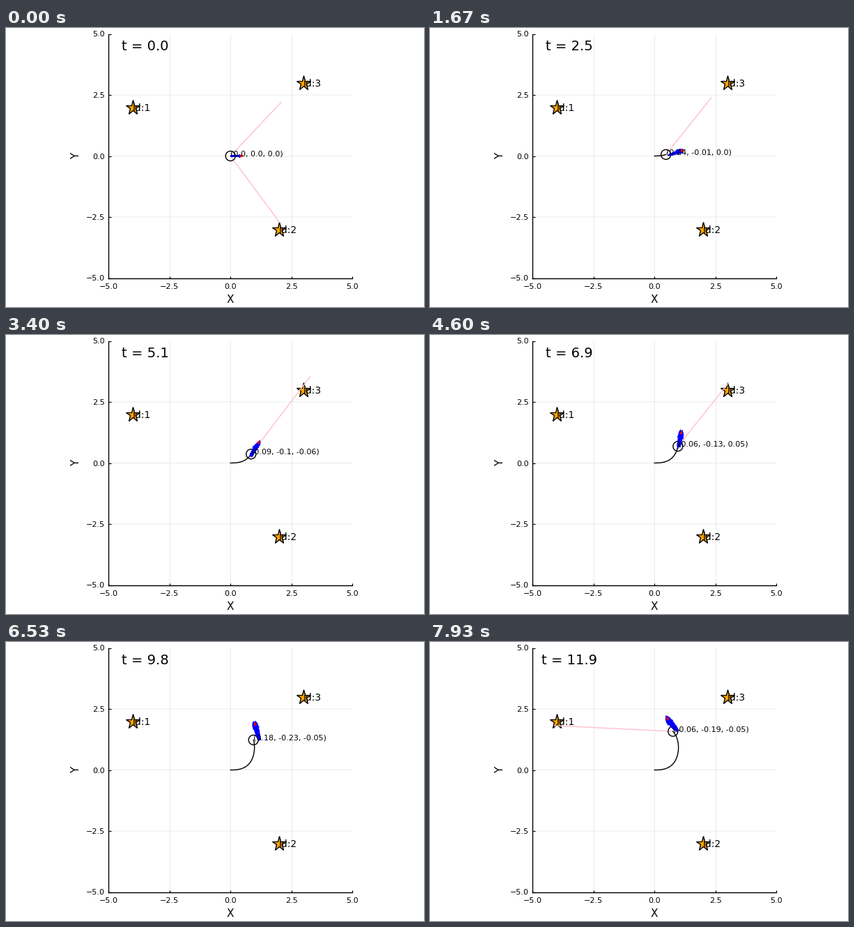
Write a matplotlib script that moves like this. It is 600 px wide and 400 px high and loops after 8 s.

```python
import numpy as np
import matplotlib.pyplot as plt
from matplotlib.animation import FuncAnimation

W, H, DPI = 600, 400, 100
STEPS, LOOP = 120, 8000
TICKS = 2 * STEPS             # two ticks per step, each step begins half a step early
PX = 72 / DPI                 # points per pixel
UNIT = 35.0                   # pixels per metre
LEFT, RIGHT, TOP, BOTTOM = 147.2, 497.2, 8.5, 358.5
N = 45                        # particles
FOV = np.radians(60)
SPEED, ARROW = 0.19, 19 / UNIT
MARKS = np.array([(-4, 2), (2, -3), (3, 3)])

plt.rcParams["font.family"] = "DejaVu Sans"
rng = np.random.default_rng(7)
time = np.arange(STEPS) / 10


def unit(angle):
    return np.stack([np.cos(angle), np.sin(angle)], axis=-1)


# Robot: steady speed on a circle, with a wobble that dies away
heading = np.radians(11 * time - 10 * (1 - time / 12) * np.sin(0.75 * time))
robot = np.vstack([(0, 0), np.cumsum(SPEED * 0.1 * unit(heading), axis=0)[:-1]])

# Printed error drifts between key points; the estimate sits that far off
KEYS = [0, 2.5, 5.1, 6.9, 8.6, 9.8, 11.9]
error = np.stack([np.interp(time, KEYS, v) for v in (
    [0, .24, .09, .06, .15, .18, -.06],
    [0, -.01, -.1, -.13, -.19, -.23, -.19],
    [0, 0, -.06, .05, -.04, -.05, -.05])], axis=1)
guess = robot + np.abs(error[:, :2])
ahead, aside = unit(heading), unit(heading + np.pi / 2)

# Particle cloud widens with time and lags a little behind the estimate
lag = -3 / UNIT * (1 - np.exp(-time))
stretch = 4 / UNIT * (1 - np.exp(-time / 3))
spread = (0.6 + 0.12 * time) / UNIT * np.minimum(1, time)
dice = np.clip(rng.normal(0, 1, (2, 3, N)), -1.6, 1.6)
rate = rng.uniform(0.6, 1.6, N)

# Range readings
gain = rng.normal(1, 0.04, (STEPS, 3))
gain[:, 2] *= np.interp(time, [0, 2.5, 5.1, 8.6], [0.72, 0.81, 1.21, 0.9])
skew = rng.normal(0.04, 0.015, (STEPS, 3))


def particles(k):
    along, across, turn = dice[0] * np.cos(rate * time[k]) + dice[1] * np.sin(rate * time[k])
    pos = (guess[k] + np.outer(lag[k] + along * stretch[k], ahead[k])
           + np.outer(across * spread[k], aside[k]))
    return pos, 0.5 * unit(heading[k] + 0.05 * turn * min(1, time[k]))


def ray(k, j):
    d = MARKS[j] - robot[k]
    bearing = np.arctan2(d[1], d[0])
    if abs(bearing - heading[k]) > FOV:
        return [], []
    end = robot[k] + np.hypot(*d) * gain[k, j] * unit(bearing + skew[k, j])
    return np.transpose([robot[k], end])


# Stage
fig = plt.figure(figsize=(W / DPI, H / DPI), dpi=DPI, facecolor="white")
ax = fig.add_axes([LEFT / W, 1 - BOTTOM / H, (RIGHT - LEFT) / W, (BOTTOM - TOP) / H])
ax.set(xlim=(-5, 5), ylim=(-5, 5))
marks = np.arange(-5, 5.1, 2.5)
names = [f"{v:.1f}".replace("-", "\u2212") for v in marks]
ax.set_xticks(marks, names)
ax.set_yticks(marks, names)
ax.tick_params(direction="in", length=3.5 * PX, width=1.2 * PX, labelsize=8)
ax.tick_params(axis="x", pad=8 * PX)
ax.tick_params(axis="y", pad=5.5 * PX)
ax.grid(color="black", alpha=0.1, lw=0.8 * PX)
for line in ax.get_ygridlines():
    line.set_snap(False)
ax.set_axisbelow(True)
for side in ("top", "right"):
    ax.spines[side].set_visible(False)
for side in ("left", "bottom"):
    ax.spines[side].set_linewidth(1.4 * PX)
fig.text(322 / W, 1 - 389 / H, "X", size=11, ha="center", va="center")
fig.text(100.8 / W, 1 - 183.5 / H, "Y", size=11, ha="center", va="center", rotation=90)

ax.plot(*MARKS.T, "*", ms=21.5 * PX, mfc="orange", mec="black", mew=1.4 * PX, zorder=3)
for j, (x, y) in enumerate(MARKS, 1):
    ax.text(x, y, f"id:{j}", size=10, ha="left", va="center_baseline", zorder=8)

rays = [ax.plot([], [], color="pink", lw=1.4 * PX, zorder=4)[0] for _ in MARKS]
trail, = ax.plot([], [], color="black", lw=1.4 * PX, zorder=5)
body = ax.add_patch(plt.Circle((0, 0), 0.2, fill=False, lw=1.4 * PX, zorder=5))


def arrows(n, color, width, head, z):
    zero = np.zeros(n)
    return ax.quiver(zero, zero, zero + 0.5, zero, color=color, units="dots", width=width,
                     scale_units="xy", scale=1, headwidth=head / width,
                     headlength=(head + 1) / width, headaxislength=(head + 1) / width,
                     minshaft=0.5, zorder=z)


def aim(quiver, pos, vec):
    quiver.set_offsets(pos)
    quiver.set_UVC(*np.transpose(vec))


shaft = arrows(1, "red", 2.8, 4.5, 6)
swarm = arrows(N, "blue", 1.4, 4.6, 6.5)
point = arrows(1, "red", 1.4, 4.6, 7)
pose = ax.text(0, 0, "", size=8, ha="left", va="baseline", zorder=8)
clock = ax.text(-3.5, 4.53, "", size=14, ha="center", va="center_baseline", zorder=8)


def draw(tick):
    k = min((tick + 1) // 2, STEPS - 1)
    for j, line in enumerate(rays):
        line.set_data(*ray(k, j))
    trail.set_data(*robot[:k + 1].T)
    body.center = robot[k]
    aim(swarm, *particles(k))
    tip = guess[k] + ARROW * ahead[k]
    for quiver, size in ((shaft, ARROW), (point, 6 / UNIT)):
        aim(quiver, [tip - size * ahead[k]], [size * ahead[k]])
    pose.set_position(robot[k])
    pose.set_text("(" + ", ".join(str(round(float(e), 2)) for e in error[k]) + ")")
    clock.set_text(f"t = {time[k]:.1f}")
    return [*rays, trail, body, shaft, swarm, point, pose, clock]


anim = FuncAnimation(fig, draw, frames=TICKS, interval=LOOP / TICKS,
                     init_func=lambda: draw(0), repeat=True, repeat_delay=0, blit=False)
plt.show()
```
